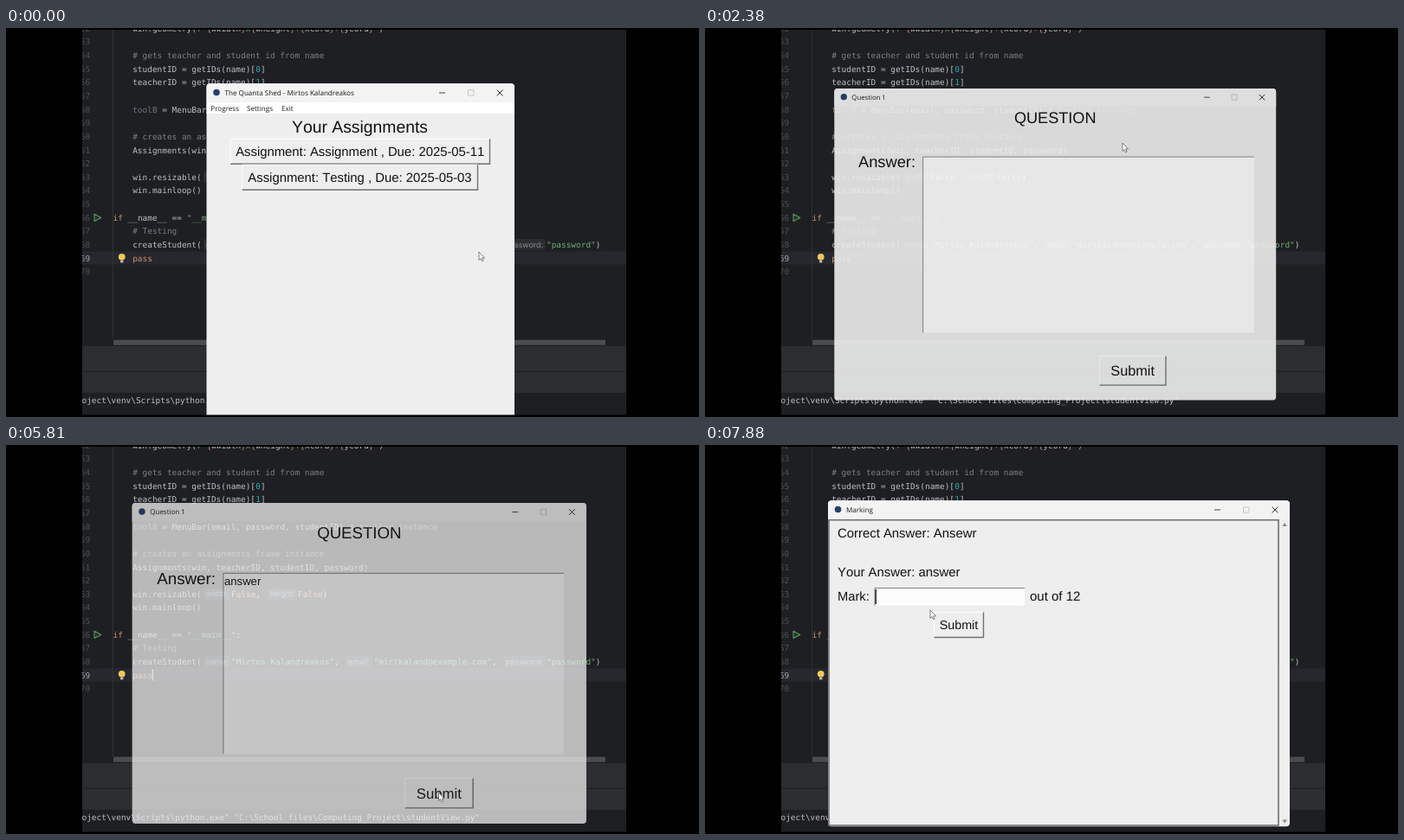
Recreate the animation shown at these times as an HTML page. Size 800 px wide and 450 px high, loop 8000 ms.

```html
<!DOCTYPE html>
<html lang="en">
<head>
<meta charset="utf-8">
<title>Assignment walkthrough</title>
<style>
  html, body { margin: 0; width: 100%; height: 100%; overflow: hidden; background: #000; }
  svg { display: block; width: 100vw; height: 100vh; }
  text { white-space: pre; text-rendering: geometricPrecision; font-kerning: none; }
  .code { font: 9.435px "DejaVu Sans Mono", monospace; font-variant-ligatures: none; fill: #bcbec4; }
  .hint { font: 8.9px Inter, sans-serif; fill: #868a91; }
  .ui { font: 8.1px "Open Sans", sans-serif; fill: #1c1c1c; }
  .form { font-family: "Liberation Sans", Arial, sans-serif; fill: #111; }
  .lit { stroke: #fff; }
  .shade { stroke: #707070; }
  .down .lit { stroke: #707070; }
  .down .shade { stroke: #fff; }
  .down text { transform: translate(.7px, .7px); }
</style>
</head>
<body>
<svg viewBox="0 0 800 450">
  <defs><clipPath id="screen"><rect x="88" y="2" width="628" height="445.5"/></clipPath></defs>
  <g clip-path="url(#screen)">
    <g id="editor"></g>
    <rect id="editCaret" x="168.7" y="259.5" width="1.2" height="13" fill="#ced0d6"/>
    <g id="list"></g>
    <g id="question"></g>
    <g id="marking"></g>
    <path id="arrow" d="M0 0V9.4L2.1 7.5 3.6 10.8 5.1 10.1 3.7 6.9H6.5Z" fill="#fff" stroke="#333" stroke-width=".6"/>
    <path id="beam" d="M-2-4.5H2M0-4.5V4.5M-2 4.5H2" fill="none" stroke="#555" stroke-width=".9"/>
  </g>
</svg>
<script>
const $ = id => document.getElementById(id);
const LOOP = 8000, TICK = 62.5, CH = 5.68;
const INK = { k: '#cf8e6d', s: '#6aab73', c: '#7a7e85', n: '#2aacb8', u: '#6f737a', d: '#bcbec4' };
const esc = s => String(s).replace(/&/g, '&amp;').replace(/</g, '&lt;');
const rect = (x, y, w, h, fill, more = '') =>
  `<rect x="${x}" y="${y}" width="${w}" height="${h}" fill="${fill}" ${more}/>`;
const line = (d, stroke, width = 1) =>
  `<path d="${d}" fill="none" stroke="${stroke}" stroke-width="${width}"/>`;
const label = (cls, x, y, s, more = '') => `<text class="${cls}" x="${x}" y="${y}" ${more}>${esc(s)}</text>`;
const form = (x, y, size, s, more = '') => label('form', x, y, s, `font-size="${size}" ${more}`);
const mid = 'text-anchor="middle"';

// ---- editor ----
const rowY = n => 31.8 + (n - 54) * 15.63;

// Tokens are "kind:text" pairs laid out on the character grid.
function code(n, x, ...tokens) {
  return tokens.map(tok => {
    const s = tok.slice(2);
    const out = label('code', x, rowY(n) + 3.3, s, `style="fill:${INK[tok[0]]}"`);
    x += s.length * CH;
    return out;
  }).join('');
}
const chip = (n, x, w, s) => rect(x, rowY(n) - 6.5, w, 13, '#2b2d30', 'rx="2.5"') +
  label('hint', x + w / 2, rowY(n) + 3, s, mid);

function editor() {
  const x = 146.2;
  let out = rect(88, 0, 628, 450, '#1e1f22') + rect(88, 258.5, 628, 15, '#26282e') +
    line('M123.5 0V360', '#313438', .8);
  for (let n = 52; n <= 70; n++)
    out += label('code', 97.2, rowY(n) + 3.3, n, `text-anchor="end" style="fill:${n == 69 ? '#a1a3ab' : '#4b5059'}"`);
  return out +
    code(52, x, 'd:win.geometry(', 's:f"', 'k:{', 'd:wwidth', 'k:}', 's:x', 'k:{', 'd:wheight', 'k:}', 's:+',
      'k:{', 'd:xcord', 'k:}', 's:+', 'k:{', 'd:ycord', 'k:}', 's:"', 'd:)') +
    code(54, x, 'c:# gets teacher and student id from name') +
    code(55, x, 'd:studentID = getIDs(name)[', 'n:0', 'd:]') +
    code(56, x, 'd:teacherID = getIDs(name)[', 'n:1', 'd:]') +
    code(58, x, 'u:toolB', 'd: = MenuBar(email, password, studentID) ', 'c:# toolbar instance') +
    code(60, x, 'c:# creates an assignments frame instance') +
    code(61, x, 'd:Assignments(win, teacherID, studentID, password)') +
    code(63, x, 'd:win.resizable(') + chip(63, 228, 31, 'width:') + code(63, 260, 'k:False', 'd:,') +
    chip(63, 302, 33.5, 'height:') + code(63, 337, 'k:False', 'd:)') +
    code(64, x, 'd:win.mainloop()') +
    code(66, 123.5, 'k:if', 'd: __name__ == ', 's:"__main__"', 'd::') +
    code(67, x, 'c:# Testing') +
    code(68, x, 'd:createStudent(') + chip(68, 228, 31, 'name:') +
    code(68, 260, 's:"Mirtos Kalandreakos"', 'd:,') + chip(68, 392, 31, 'email:') +
    code(68, 424.6, 's:"mirtkaland@example.com"', 'd:,') + chip(68, 574, 48.5, 'password:') +
    code(68, 624, 's:"password"', 'd:)') +
    code(69, x, 'k:pass') +
    '<path d="M102 215.2V223.6L109.8 219.4Z" fill="#253627" stroke="#57965c" stroke-width="1.1" stroke-linejoin="round"/>' +
    '<circle cx="133.7" cy="264.8" r="3.9" fill="#f2c55c"/>' + rect(132, 269, 3.4, 2.4, '#b9b9b9') +
    rect(124, 360.8, 568, 6, '#4b4c4f') +
    rect(88, 368, 628, 54, '#2b2d30') + rect(88, 396.8, 628, 1, '#1e1f22') +
    label('code', 547, 433.7,
      'Project\\venv\\Scripts\\python.exe" "C:\\School files\\Computing_Project\\studentView.py"', 'text-anchor="end"');
}

// ---- windows ----
const bevel = (x, y, w, h) =>
  `<path class="shade" d="M${x + .5} ${y + h - .5}H${x + w - .5}V${y + .5}" fill="none" stroke-width="1.4"/>` +
  `<path class="lit" d="M${x + .5} ${y + h - 1}V${y + .5}H${x + w - 1}" fill="none"/>`;
const button = (id, x, y, w, h, size, s) => `<g id="${id}">` + rect(x, y, w, h, '#eee') + bevel(x, y, w, h) +
  form(x + w / 2, y + h / 2 + size * .35, size, s, mid) + '</g>';
const well = (x, y, w, h) => rect(x, y, w, h, '#fdfdfd') +
  line(`M${x + .5} ${y + h}V${y + .5}H${x + w}`, '#808080');

function frame(x, w, h, title) {
  const r = x + w, y = 75;
  return rect(x, 64.3, w, h, '#eee', 'rx="4"') +
    `<path d="M${x} 86V68.3q0-4 4-4H${r - 4}q4 0 4 4V86Z" fill="#f3f3f3"/>` +
    `<circle cx="${x + 11.5}" cy="74.5" r="3.8" fill="#24406b"/>` +
    label('ui', x + 21, 77.8, title) +
    line(`M${r - 87} ${y}h7`, '#333', .9) +
    line(`M${r - 53.5} ${y - 3.2}h6.4v6.4h-6.4Z`, '#c4c4c4', .9) +
    line(`M${r - 20.3} ${y - 3.4}l6.8 6.8m0-6.8l-6.8 6.8`, '#222', 1);
}

$('editor').innerHTML = editor();

$('list').innerHTML = frame(231.5, 355.5, 400, 'The Quanta Shed - Mirtos Kalandreakos') +
  rect(231.5, 86, 355.5, 13, '#fff') +
  label('ui', 236.3, 95.8, 'Progress') + label('ui', 278, 95.8, 'Settings') + label('ui', 318, 95.8, 'Exit') +
  form(408.5, 121.2, 19.35, 'Your Assignments', mid) +
  button('first', 258.5, 127.8, 300.5, 30, 14.85, 'Assignment: Assignment , Due: 2025-05-11') +
  button('second', 272, 157.8, 273, 30, 14.85, 'Assignment: Testing , Due: 2025-05-03');

$('question').innerHTML = frame(142, 533, 377, 'Question 1') +
  form(408.5, 106.4, 18.95, 'QUESTION', mid) + form(171, 160, 19.1, 'Answer:') +
  well(248.5, 146.5, 400, 213) + form(250.2, 160.4, 13.3, '', 'id="typed"') +
  rect(250.2, 148, 1.4, 15.5, '#333', 'id="textCaret"') +
  button('send', 461.5, 387.5, 81, 36, 17, 'Submit');

$('marking').innerHTML = frame(142, 533, 377, 'Marking') +
  line('M143 86.7H662V440H143Z', '#6e6e6e', 1.6) +
  '<path d="M666.4 94L669.2 90 672 94Z M666.4 433.5L669.2 437.5 672 433.5Z" fill="#8a8a8a"/>' +
  form(153, 106.6, 14.88, 'Correct Answer: Ansewr') + form(153, 152.2, 14.9, 'Your Answer: answer') +
  form(153, 180.4, 14.7, 'Mark:') + form(375, 180.4, 15, 'out of 12') +
  well(195.5, 165, 173.5, 20.8) + rect(196.4, 167, 1.5, 17, '#222', 'id="entryCaret"') +
  button('grade', 264, 193, 58, 30, 14.3, 'Submit');

// ---- motion ----
const MOUSE = [
  [687.5, 546, 259], [1187.5, 490, 121], [1312.5, 482, 133], [2750, 482, 133], [3062.5, 398.5, 184],
  [5125, 398.5, 184], [5562.5, 499.5, 402], [6687.5, 499.5, 402], [7250, 300, 186], [7437.5, 272, 176],
  [7562.5, 272, 176], [7875, 260, 191]
];
const KEYS = [3812.5, 3937.5, 4062.5, 4187.5, 4375, 4562.5];
const WORD = 'answer';
const ADVANCE = [.556, .556, .5, .722, .556, .333];

const show = (id, on) => $(id).setAttribute('visibility', on ? 'inherit' : 'hidden');
const within = (t, a, b) => t >= a && t < b;
const inBox = (p, x, y, w, h) => within(p[0], x, x + w) && within(p[1], y, y + h);

function mouseAt(t) {
  const i = MOUSE.findIndex(k => k[0] > t);
  if (i < 1) return (i ? MOUSE[MOUSE.length - 1] : MOUSE[0]).slice(1);
  const [t0, x0, y0] = MOUSE[i - 1], [t1, x1, y1] = MOUSE[i];
  const p = (t - t0) / (t1 - t0), e = p * p * (3 - 2 * p);
  return [x0 + (x1 - x0) * e, y0 + (y1 - y0) * e];
}

// Windows grow in about one point and shrink away about another.
function pose(id, t, opens, closes) {
  let scale = 1, alpha = 1, cx = 310, cy = 194;
  if (t >= closes) {
    const p = (t - closes) / 250;
    scale = 1 - .065 * p;
    alpha = Math.max(0, 1 - p);
    [cx, cy] = [366, 231];
  } else {
    const p = Math.max(0, Math.min(1, (t - opens) / 250));
    scale = 1 - .077 * (1 - p) ** 2;
    alpha = Math.min(1, .6 + 1.2 * p);
  }
  show(id, t >= opens && alpha > 0);
  $(id).setAttribute('opacity', alpha);
  $(id).setAttribute('transform', `translate(${cx} ${cy}) scale(${scale}) translate(${-cx} ${-cy})`);
}

function draw(now) {
  const t = Math.floor((now % LOOP + 3) / TICK) * TICK;
  pose('list', t, -1000, 1500);
  pose('question', t, 2312.5, 5750);
  pose('marking', t, 6500, 9000);
  $('first').classList.toggle('down', within(t, 1375, 1500));
  $('send').classList.toggle('down', within(t, 5625, 5750));

  const count = KEYS.filter(k => k <= t).length;
  $('typed').textContent = WORD.slice(0, count);
  const width = ADVANCE.slice(0, count).reduce((a, b) => a + b, 0) * 13.3;
  $('textCaret').setAttribute('x', 250.2 + width);
  show('textCaret', within(t, 3087, 5750) && (t - 3087) % 900 < 600);
  show('entryCaret', t >= 7500);
  show('editCaret', within(t, 1625, 2125) || within(t, 5812.5, 6562.5));

  const p = mouseAt(t);
  const beam = within(t, 2562.5, 5750) && inBox(p, 248.5, 146.5, 400, 213) ||
    t >= 6750 && inBox(p, 195.5, 165, 173.5, 20.8);
  show('beam', beam);
  show('arrow', !beam);
  $(beam ? 'beam' : 'arrow').setAttribute('transform', `translate(${p})`);
}

const start = performance.now();
function tick() {
  draw(performance.now() - start);
  requestAnimationFrame(tick);
}
tick();
</script>
</body>
</html>
```
